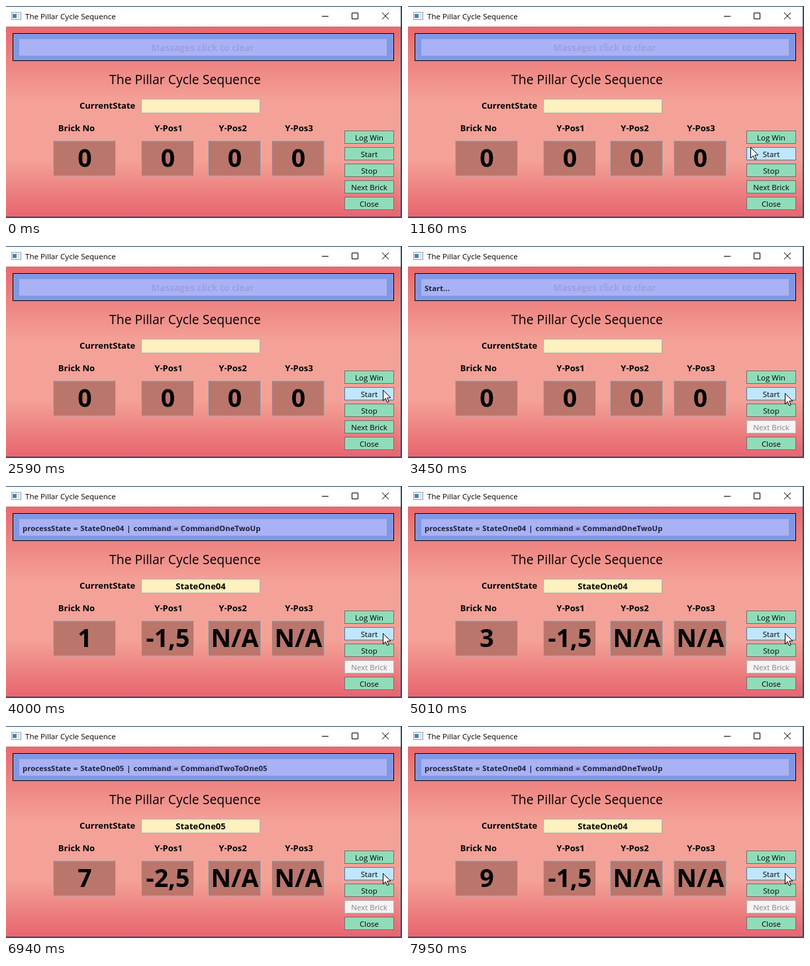
Animation, 598 px wide and 320 px high, one loop 8000 ms. Source, as an HTML page:

```html
<!DOCTYPE html>
<html lang="en">
<head>
<meta charset="utf-8">
<title>The Pillar Cycle Sequence</title>
<style>
  html, body { margin: 0; width: 100%; height: 100%; overflow: hidden; }
  svg { display: block; width: 598px; height: 320px; font-family: "Open Sans", "Noto Sans", sans-serif; cursor: default; }
  .mid { text-anchor: middle; }
  .label { font-size: 13px; font-weight: 700; }
  .value { font-size: 37.5px; font-weight: 700; text-anchor: middle; }
  .field { fill: #bb766c; stroke: #abadb3; }
  .line { fill: none; stroke: #000; }
  #message { font-size: 11.4px; font-weight: 700; word-spacing: 1px; fill: #20223c; }
  .button rect { fill: #8fdcb9; stroke: #707070; }
  .button text { font-size: 11.5px; text-anchor: middle; }
  .hover rect { fill: #bee6fd; stroke: #3c7fb1; }
  .pressed rect { fill: #c4e5f6; stroke: #2c628b; }
  .disabled rect { fill: #f4f4f4; stroke: #adb2b5; }
  .disabled text { fill: #838383; }
</style>
</head>
<body>
<svg viewBox="0 0 598 320">
  <defs>
    <linearGradient id="back" x1="0" y1="0" x2="0" y2="1">
      <stop offset="0" stop-color="#e8686f"/>
      <stop offset=".4" stop-color="#f4a297"/>
      <stop offset=".7" stop-color="#f4a297"/>
      <stop offset="1" stop-color="#e7656f"/>
    </linearGradient>
  </defs>

  <!-- desktop, window edge, window -->
  <rect width="598" height="320" fill="#245f92"/>
  <rect width="597" height="319" fill="#1f4468"/>
  <rect y="1" width="596" height="30" fill="#fff"/>
  <rect y="31" width="596" height="287" fill="url(#back)"/>

  <!-- title bar -->
  <rect x="8.5" y="9.5" width="14" height="11" fill="#f4f6f8" stroke="#98a1a9"/>
  <rect x="10" y="12" width="6" height="6" fill="#3c86b8"/>
  <path d="M18 13.5h3M18 16.5h3" stroke="#b5bcc3"/>
  <text x="29" y="20" font-size="11.6">The Pillar Cycle Sequence</text>
  <path class="line" d="M477 15.5h10M522.5 10.5h9v9h-9zM568 10l10 10M578 10l-10 10"/>

  <!-- message bar -->
  <rect x="10.5" y="41.5" width="575" height="41" fill="#8098e4" stroke="#000"/>
  <rect x="20" y="50" width="555" height="25" fill="#a9b2f4"/>
  <text class="mid" x="297" y="68" font-size="13.7" font-weight="700" fill="#a09fe2">Massages click to clear</text>
  <text id="message" x="25" y="68"></text>

  <text class="mid" x="270.5" y="118" font-size="19.4">The Pillar Cycle Sequence</text>
  <text class="label" x="111" y="155">CurrentState</text>
  <rect x="204.5" y="140.5" width="179" height="21" fill="#fff0bf" stroke="#abadb3"/>
  <text id="state" class="label mid" x="294" y="156"></text>

  <g id="fields"></g>
  <g id="buttons"></g>
  <path id="cursor" d="M.5 .5V16.5L4.2 13L6.8 18.8L9.2 17.8L6.7 12H11.8Z" fill="#fff" stroke="#000"/>
</svg>
<script>
const LOOP = 8000;
const $ = id => document.getElementById(id);

function add(parent, tag, attrs, text = "") {
  const el = document.createElementNS("http://www.w3.org/2000/svg", tag);
  for (const key in attrs) el.setAttribute(key, attrs[key]);
  el.textContent = text;
  return parent.appendChild(el);
}

// label, label centre, box left, box width
const values = [
  ["Brick No", 106.5, 71.5, 94],
  ["Y-Pos1", 245.5, 204.5, 79],
  ["Y-Pos2", 342.5, 305.5, 79],
  ["Y-Pos3", 442.5, 401.5, 79]
].map(([name, mid, x, width]) => {
  add($("fields"), "text", { class: "label mid", x: mid, y: 189 }, name);
  add($("fields"), "rect", { class: "field", x, y: 203.5, width, height: 53 });
  return add($("fields"), "text", { class: "value", x: x + width / 2 + .5, y: 243 });
});

const BUTTON = { x: 511, width: 75, height: 20, top: 188, gap: 25 };
const buttons = ["Log Win", "Start", "Stop", "Next Brick", "Close"].map((name, i) => {
  const y = BUTTON.top + i * BUTTON.gap;
  const el = add($("buttons"), "g", {});
  add(el, "rect", { x: BUTTON.x + .5, y: y + .5, width: BUTTON.width - 1, height: BUTTON.height - 1 });
  add(el, "text", { x: BUTTON.x + BUTTON.width / 2, y: y + 15 }, name);
  return { el, y };
});

// pointer strokes: start time, then positions 80 ms apart
const strokes = [
  [0, [480, 330]],
  [220, [481, 306], [482, 283], [477, 288]],
  [530, [483, 283]],
  [920, [487, 272], [495, 252], [506, 231], [517, 213], [523, 199], [527, 190]],
  [1480, [531, 189], [537, 188], [544, 188], [551, 189], [558, 191], [564, 194], [568, 196]],
  [2190, [568, 198], [568, 201], [568, 205], [568, 209], [568, 213], [569, 217], [569, 220], [569, 222]]
];
const path = strokes.flatMap(([start, ...points]) => points.map((p, i) => [start + 80 * i, ...p]));

const PRESS = 3290, RELEASE = 3450;

// time, state, command, Y-Pos1, Y-Pos2
const runs = [
  [4000, "One04", "OneTwoUp", "-1,5", "N/A"],
  [4460, "One05", "OneTwoDown", "-2,5", "N/A"],
  [5010, "One04", "OneTwoUp", "-1,5", "N/A"],
  [5470, "One05", "OneTwoDown", "-2,5", "N/A"],
  [5940, "One04", "OneTwoUp", "-1,5", "N/A"],
  [6480, "Three04", "TwoThreeDown", "N/A", "N/A"],
  [6940, "One05", "TwoToOne05", "-2,5", "N/A"],
  [7490, "One05", "OneTwoDown", "-2,5", "N/A"],
  [7950, "One04", "OneTwoUp", "-1,5", "N/A"]
];

const lastIndex = (list, t) => list.filter(([start]) => start <= t).length - 1;

function setText(el, text) {
  if (el.textContent !== text) el.textContent = text;
}

function drawRun(t) {
  const i = lastIndex(runs, t);
  if (i < 0) {
    setText($("message"), t >= RELEASE ? "Start..." : "");
    setText($("state"), "");
    values.forEach(el => setText(el, "0"));
    return;
  }
  const [, state, command, pos1, pos2] = runs[i];
  setText($("message"), `processState = State${state} | command = Command${command}`);
  setText($("state"), "State" + state);
  [String(i + 1), pos1, pos2, "N/A"].forEach((text, k) => setText(values[k], text));
}

function drawPointer(t) {
  const [, x, y] = path[lastIndex(path, t)];
  $("cursor").setAttribute("transform", `translate(${x} ${y})`);
  buttons.forEach((b, i) => {
    const over = x >= BUTTON.x && x < BUTTON.x + BUTTON.width && y >= b.y && y < b.y + BUTTON.height;
    let look = over ? "hover" : "";
    if (i === 1 && t >= PRESS && t < RELEASE) look = "pressed";
    if (i === 3 && t >= RELEASE) look = "disabled";
    b.el.setAttribute("class", "button " + look);
  });
}

function draw() {
  const t = performance.now() % LOOP;
  drawRun(t);
  drawPointer(t);
  requestAnimationFrame(draw);
}
draw();
</script>
</body>
</html>
```
